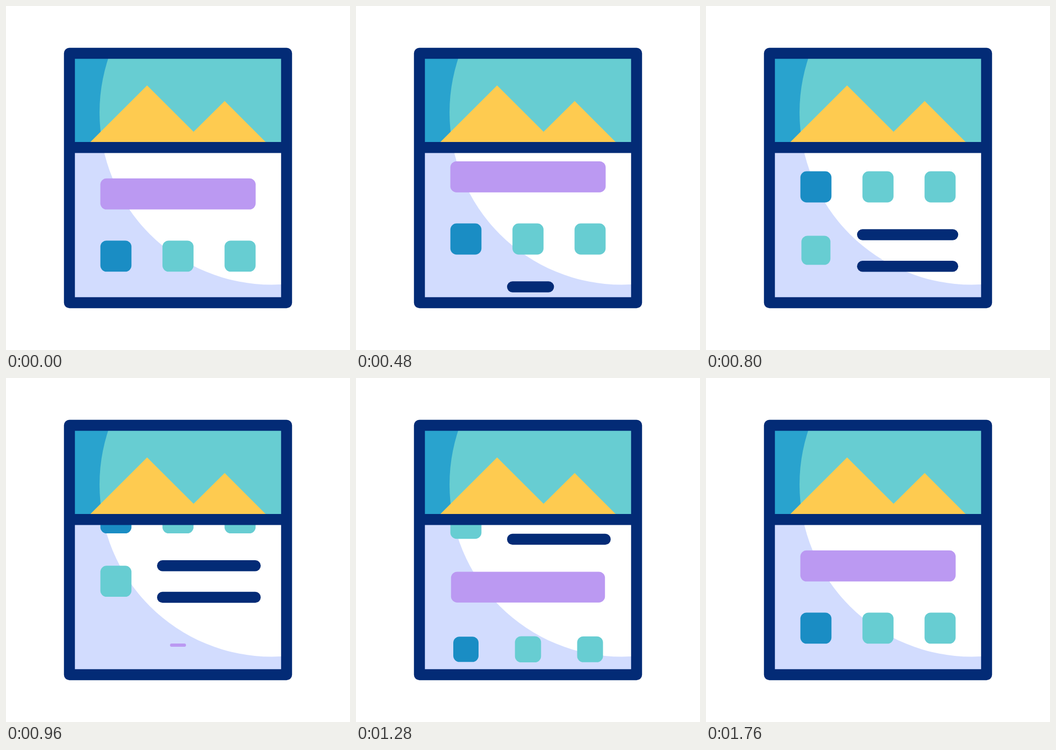
Animation of 640 by 640 pixels, one loop 2 s. Source, as an HTML page:

```html
<!DOCTYPE html>
<html lang="en">
<head>
<meta charset="utf-8">
<title>Scrolling page</title>
<style>
  html, body { margin: 0; width: 100%; height: 100%; overflow: hidden; background: #fff; }
  svg { display: block; width: 100vw; height: 100vh; }
  .navy { fill: none; stroke: #032b76; stroke-width: 20.4; stroke-linecap: round; stroke-linejoin: round; }
</style>
</head>
<body>
<svg viewBox="0 0 640 640">
  <defs>
    <clipPath id="header"><rect x="118" y="88" width="404" height="175"/></clipPath>
    <clipPath id="body"><rect x="118" y="263" width="404" height="289"/></clipPath>
  </defs>
  <g clip-path="url(#header)">
    <rect x="118" y="88" width="404" height="175" fill="#29a3ce"/>
    <circle cx="494.3" cy="198.2" r="320.3" fill="#67cdd2"/>
    <path d="M147 263 262.5 147.7 349 234 406.8 176.7 493 263Z" fill="#fecb50"/>
  </g>
  <g clip-path="url(#body)">
    <rect x="118" y="263" width="404" height="289" fill="#d2dcfe"/>
    <circle cx="494.3" cy="198.2" r="320.3" fill="#fff"/>
    <g id="content"></g>
  </g>
  <path class="navy" d="M118 88H522V552H118ZM118 263.3H522"/>
</svg>
<script>
const LOOP = 2000, STEP = 40, SCROLL = 352.5, BOX = 57.8;
const TEAL = '#67cdd2', BLUE = '#1a8dc4', PURPLE = '#bb99f2';
const content = document.getElementById('content');

const clamp = v => Math.min(1, Math.max(0, v));

// Symmetric cubic bezier (.58, 0, .42, 1), solved by bisection
function easeInOut(p) {
  if (p <= 0 || p >= 1) return clamp(p);
  let lo = 0, hi = 1, s = 0.5;
  for (let i = 0; i < 24; i++) {
    s = (lo + hi) / 2;
    const r = 1 - s;
    const x = 3 * 0.58 * s * r * r + 3 * 0.42 * s * s * r + s * s * s;
    if (x < p) lo = s; else hi = s;
  }
  return s * s * (3 - 2 * s);
}
const easeOut = p => 1 - (1 - clamp(p)) ** 2.4;

function add(tag, attrs) {
  const el = document.createElementNS('http://www.w3.org/2000/svg', tag);
  set(el, attrs);
  content.append(el);
  return el;
}
function set(el, attrs) {
  for (const name in attrs) el.setAttribute(name, attrs[name]);
}

const parts = [];

// Rounded block that grows from its centre; the corner radius stays fixed
function block(cx, cy, width, fill, start = -1, duration = 1) {
  const el = add('rect', { fill, rx: 11.5, ry: 11.5 });
  parts.push(t => {
    const k = easeInOut((t - start) / duration);
    const w = width * k, h = BOX * k, r = Math.min(11.5, h / 2);
    set(el, { x: cx - w / 2, y: cy - h / 2, width: w, height: h, rx: r, ry: r });
  });
}

// Round-capped line drawn from left to right
function line(y, start, duration) {
  const el = add('line', { class: 'navy', x1: 291.2, y1: y, y2: y });
  parts.push(t => {
    const k = easeOut((t - start) / duration);
    set(el, { x2: 291.2 + 172.5 * k, visibility: k > 0 ? 'visible' : 'hidden' });
  });
}

block(320, 349.7, 289, PURPLE);
block(204.5, 465.4, BOX, BLUE);
block(320, 465.4, BOX, TEAL);
block(435.5, 465.4, BOX, TEAL);

block(204.5, 583.4, BOX, TEAL, 414, 497);
line(554.4, 380, 540);
line(613.2, 380, 540);

block(320, 349.7 + SCROLL, 289, PURPLE, 825, 500);
block(204.5, 465.4 + SCROLL, BOX, BLUE, 688, 900);
block(320, 465.4 + SCROLL, BOX, TEAL, 670, 900);
block(435.5, 465.4 + SCROLL, BOX, TEAL, 676, 900);

const origin = performance.now();
function draw(now) {
  const t = Math.floor((Math.max(0, now - origin) % LOOP) / STEP) * STEP;
  content.setAttribute('transform', `translate(0 ${-SCROLL * easeInOut((t - 40) / 1720)})`);
  parts.forEach(update => update(t));
  requestAnimationFrame(draw);
}
draw(origin);
</script>
</body>
</html>
```
